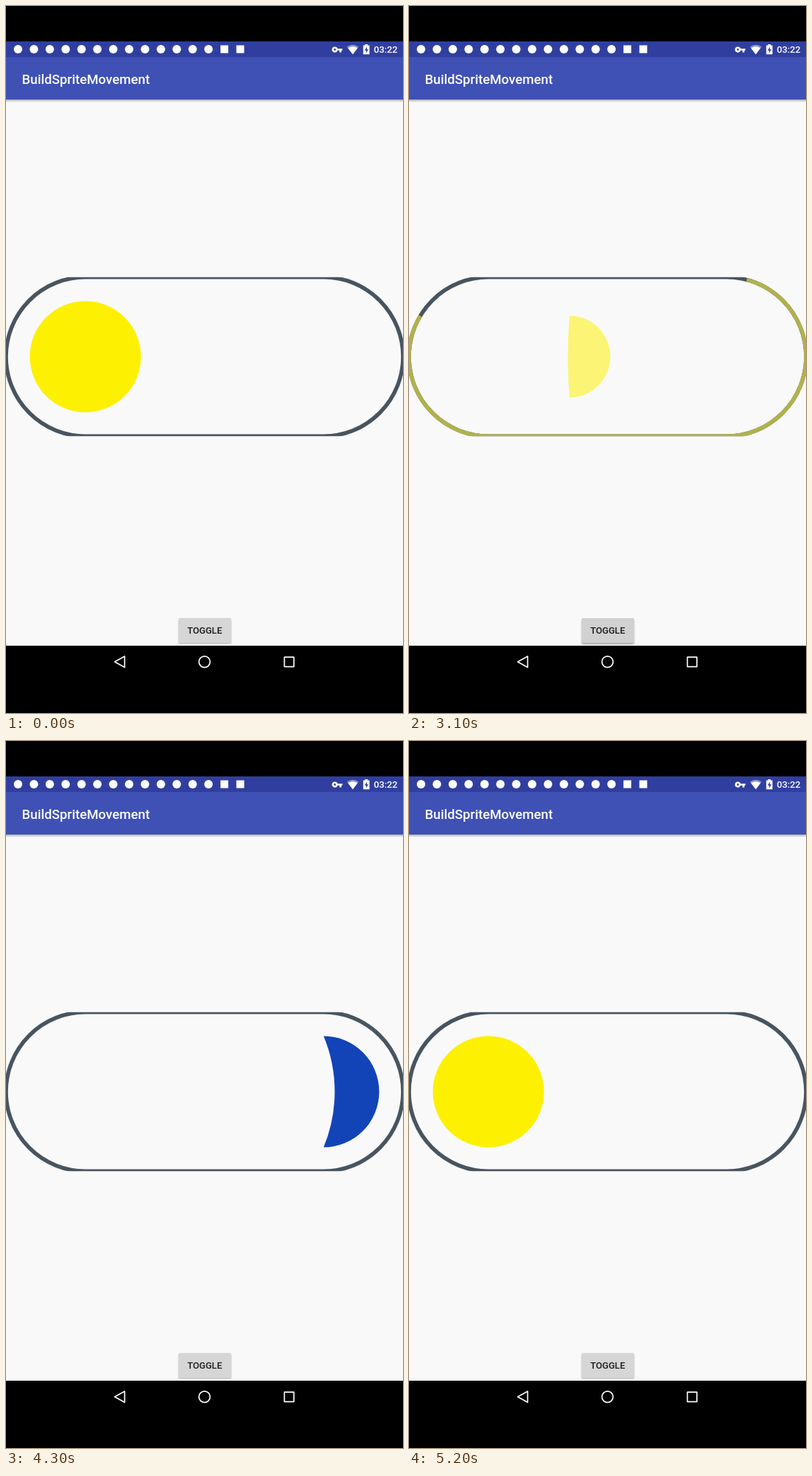
Recreate the animation shown at these times as an HTML page. Size 561 px wide and 998 px high, loop 5.3 s.

```html
<!DOCTYPE html>
<html lang="en">
<head>
<meta charset="utf-8">
<title>Day and night toggle</title>
<style>
  html, body { margin: 0; width: 100%; height: 100%; overflow: hidden; background: #000; }
  svg { display: block; }
  text { font-family: Roboto, "Noto Sans", sans-serif; font-weight: 500; }
</style>
</head>
<body>
<svg width="561" height="998" viewBox="0 0 561 998">
  <defs>
    <linearGradient id="drop" x2="0" y2="1">
      <stop stop-color="#000" stop-opacity=".3"/>
      <stop offset="1" stop-color="#000" stop-opacity="0"/>
    </linearGradient>
    <filter id="soft" x="-20%" y="-30%" width="140%" height="160%">
      <feGaussianBlur stdDeviation="1.3"/>
    </filter>
  </defs>

  <rect width="561" height="998"/>
  <rect y="132" width="561" height="771" fill="#f9f9f9"/>
  <rect y="50" width="561" height="22" fill="#303f9f"/>
  <rect y="72" width="561" height="60" fill="#3f51b5"/>
  <rect y="132" width="561" height="4" fill="url(#drop)"/>
  <text x="22.5" y="110" font-size="18.7" fill="#fff">BuildSpriteMovement</text>

  <g id="notices" fill="#fff"></g>
  <g fill="#fff">
    <path fill-rule="evenodd" d="M464.7 57.4a4.1 4.1 0 1 0 3.9 5.4h2.6v2.7h2.8v-2.7h1.4v-2.6h-6.8a4.1 4.1 0 0 0-3.9-2.8zm0 2.7a1.4 1.4 0 1 1 0 2.8a1.4 1.4 0 0 1 0-2.8z"/>
    <path opacity=".45" d="M490 68.3L481.8 57.6Q490 51.8 498.2 57.6Z"/>
    <path d="M490 68.3L483.3 59.6Q490 55 496.7 59.6Z"/>
    <path d="M507.4 54h3.6v1.5h2.6v12.8h-8.8V55.5h2.6z"/>
    <path fill="#303f9f" d="M510 57.6l-3.2 5.2h2.1v3.8l3.2-5.3h-2.1z"/>
    <text x="519.8" y="66.2" font-size="13.2">03:22</text>
  </g>

  <svg y="382.8" width="561" height="224.4" viewBox="0 0 50 20">
    <g fill="none" stroke-width=".5">
      <path stroke="#485560" d="M10 0H40A10 10 0 0 1 40 20H10A10 10 0 0 1 10 0Z"/>
      <path id="trail" stroke="#b2b14e" pathLength="1" d="M10 0H40A10 10 0 0 1 40 20H10A10 10 0 0 1 10 0Z"/>
    </g>
    <path id="knob"/>
  </svg>

  <rect id="shade" x="244" y="865.5" width="74" height="35" rx="2" filter="url(#soft)"/>
  <rect id="button" x="244" y="864" width="74" height="35" rx="2"/>
  <text x="280.8" y="886" font-size="13.1" text-anchor="middle" fill="#1b1b1b">TOGGLE</text>

  <g fill="none" stroke="#fff" stroke-width="1.7" stroke-linejoin="round">
    <path d="M153.6 925.7L167.6 918V933.6Z"/>
    <circle cx="280.5" cy="925.8" r="7.9"/>
    <rect x="393.4" y="919.2" width="13.4" height="13.4"/>
  </g>
</svg>

<script>
const LOOP = 5300, STEP = 100;
const SPAN = 800, HALF = SPAN / 2;
const TO_NIGHT = 2779, TO_DAY = 4332;
const YELLOW = [253, 240, 0], BLUE = [18, 68, 184];

const $ = id => document.getElementById(id);
const set = (el, attrs) => { for (const k in attrs) el.setAttribute(k, attrs[k]); };
const clamp = x => Math.min(1, Math.max(0, x));
const mix = (a, b, p) => a + (b - a) * p;
const smooth = x => (1 - Math.cos(Math.PI * clamp(x))) / 2;
const easeIn = x => clamp(x) ** 2;
const easeOut = x => 1 - (1 - clamp(x)) ** 2;

// Status bar notices: a row of dots, then two squares
for (let i = 0; i < 15; i++) {
  const x = 17 + i * 22.43;
  $('notices').insertAdjacentHTML('beforeend', i < 13
    ? `<circle cx="${x}" cy="61" r="6"/>`
    : `<rect x="${x - 5.5}" y="55.5" width="11" height="11"/>`);
}

// Half disc on the right, closed by an arc that bulges left by `bulge` radii
function knobPath(cx, r, bulge) {
  const depth = Math.abs(bulge) * r;
  const top = 10 - r, bottom = 10 + r;
  const right = `M${cx} ${top}A${r} ${r} 0 0 1 ${cx} ${bottom}`;
  if (depth < 0.005) return right + 'Z';
  const arc = (r * r + depth * depth) / (2 * depth);
  return right + `A${arc} ${arc} 0 0 ${bulge > 0 ? 1 : 0} ${cx} ${top}Z`;
}

function drawKnob(t, night) {
  const u = clamp((t - 83) / 600);
  const dip = u < 0.5 ? smooth(u * 2) : smooth(2 - u * 2);
  const moved = night ? smooth(u) : 1 - smooth(u);
  const blue = night ? smooth((t - 318) / 482) : 1 - smooth((t - 95) / 500);
  const first = t / HALF, second = first - 1;
  const bulge = night
    ? 1 - easeOut(first) - 0.2 * easeIn(second)
    : -0.2 * (1 - easeOut(first)) + easeIn(second);
  const rgb = YELLOW.map((c, i) => Math.round(mix(c, BLUE[i], blue)));
  set($('knob'), {
    d: knobPath(mix(10, 40, moved), 7 * mix(1, 0.705, dip), bulge),
    fill: `rgb(${rgb})`,
    'fill-opacity': mix(1, 0.48, dip)
  });
}

function drawTrail(t, night) {
  const active = t >= 0 && t < SPAN;
  const p = smooth(t / SPAN), len = 1 - p;
  const mid = night ? 0.586 + 0.018 * p : 0.459;
  set($('trail'), {
    visibility: active ? 'visible' : 'hidden',
    'stroke-dasharray': `${len} ${p}`,
    'stroke-dashoffset': len / 2 - mid
  });
}

function drawButton(t) {
  const press = t < 0 ? 0 : 1 - clamp((t - 150) / 300);
  const g = Math.round(mix(214, 202, press));
  set($('button'), { fill: `rgb(${g},${g},${g})` });
  set($('shade'), { y: mix(865.3, 867, press), 'fill-opacity': mix(0.3, 0.4, press) });
}

function draw(now) {
  const time = Math.floor((now % LOOP) / STEP) * STEP;
  const night = time < TO_DAY;
  const t = time - (night ? TO_NIGHT : TO_DAY);
  drawTrail(t, night);
  drawKnob(t, night);
  drawButton(t);
}

let start;
function tick(now) {
  start ??= now;
  draw(now - start);
  requestAnimationFrame(tick);
}
draw(0);
requestAnimationFrame(tick);
</script>
</body>
</html>
```
